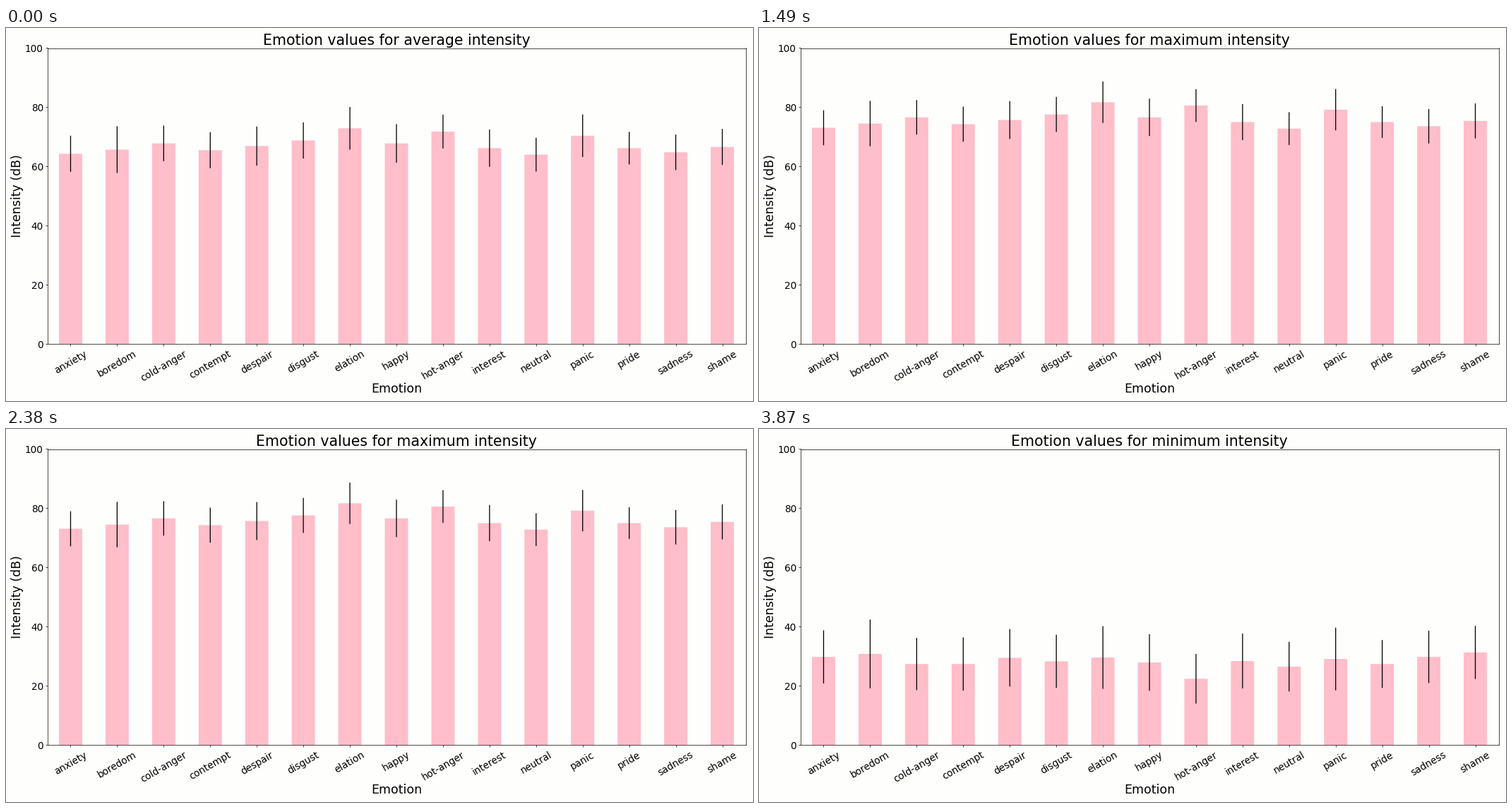
Write a matplotlib script that moves like this. It is 1058 px wide and 529 px high and loops after 4470 ms.

```python
import numpy as np
import matplotlib.pyplot as plt
from matplotlib.animation import FuncAnimation

W, H, DPI = 1058, 529, 64
LEFT, RIGHT, TOP, BOTTOM = 58.5, 1047.5, 28.5, 448.3
BACK, PINK = "#fefefd", "#ffbec9"
KINDS = ["average", "maximum", "minimum"]

# emotion: average level, its spread, minimum level (dB)
LEVELS = dict(
    anxiety=(64.3, 6.1, 29.8), boredom=(65.7, 7.9, 30.8), cold_anger=(67.8, 6.0, 27.4),
    contempt=(65.5, 6.1, 27.4), despair=(66.9, 6.6, 29.5), disgust=(68.8, 6.1, 28.3),
    elation=(72.9, 7.2, 29.6), happy=(67.8, 6.5, 27.9), hot_anger=(71.8, 5.7, 22.4),
    interest=(66.2, 6.3, 28.4), neutral=(64.0, 5.7, 26.5), panic=(70.4, 7.2, 29.1),
    pride=(66.2, 5.5, 27.4), sadness=(64.8, 6.0, 29.8), shame=(66.6, 6.1, 31.3))
average, spread, minimum = np.array(list(LEVELS.values())).T


def stats(kind):
    """Bar heights and error sizes; the other spreads follow the average one."""
    if kind == "maximum":
        return average + 8.8, spread * 0.97
    if kind == "minimum":
        return minimum, spread * 1.47
    return average, spread


def px(n):
    """Pixels to points."""
    return n * 72 / DPI


def label(x, y, text, size, **kw):
    return fig.text(x / W, 1 - y / H, text, fontsize=px(size), ha="center", **kw)


plt.rcParams["font.family"] = "DejaVu Sans"
fig = plt.figure(figsize=(W / DPI, H / DPI), dpi=DPI, facecolor=BACK)
ax = fig.add_axes([LEFT / W, 1 - BOTTOM / H, (RIGHT - LEFT) / W, (BOTTOM - TOP) / H],
                  facecolor=BACK)

x = np.arange(len(LEVELS))
bars = ax.bar(x, np.zeros(len(x)), 0.5, color=PINK, snap=False)
errors = ax.vlines(x, 0, 0, color="black", lw=px(1.3), zorder=3, snap=False)

ax.set_xlim(-0.5, len(x) - 0.5)
ax.set_ylim(0, 100)
ax.set_xticks(x, [name.replace("_", "-") for name in LEVELS], rotation=30)
ax.tick_params(labelsize=px(13.65), length=px(3), width=px(0.7))
ax.tick_params(axis="x", pad=px(3.8))
ax.tick_params(axis="y", pad=px(2.6))
for spine in ax.spines.values():
    spine.set_linewidth(px(0.7))

title = label(553, 24, "", 20.55, va="baseline")
label(553.2, 517.4, "Emotion", 17.4, va="baseline")
label(15.6, 238.1, "Intensity (dB)", 17.4, va="center", rotation=90)


def draw(i):
    kind = KINDS[i % len(KINDS)]
    means, stds = stats(kind)
    for bar, mean in zip(bars, means):
        bar.set_height(mean)
    errors.set_segments([[(a, m - s), (a, m + s)] for a, m, s in zip(x, means, stds)])
    title.set_text(f"Emotion values for {kind} intensity")
    return [*bars, errors, title]


anim = FuncAnimation(fig, draw, frames=len(KINDS), interval=1490,
                     init_func=lambda: draw(0), repeat=True, repeat_delay=0)
plt.show()
```
